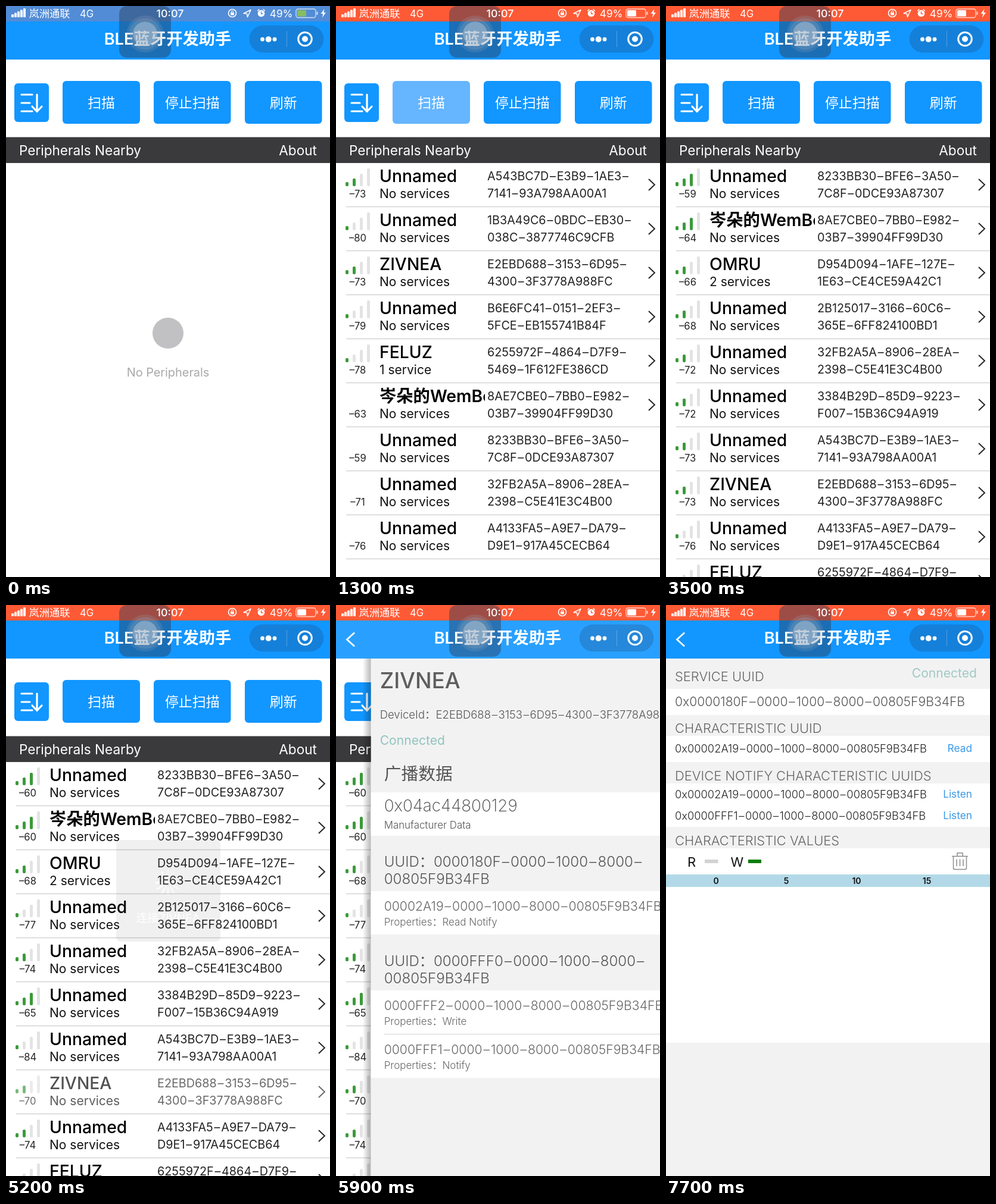
An HTML page for the animation above (8000 ms loop, 544x960 px).

```html
<!DOCTYPE html>
<html lang="zh-CN">
<head>
<meta charset="utf-8">
<title>BLE</title>
<style>
html, body { margin: 0; width: 100%; height: 100%; overflow: hidden; background: #fff; }
svg { display: block; width: 100%; height: 100%; }
text { font-family: Inter, "Noto Sans CJK SC", "Noto Sans CJK", sans-serif; white-space: pre; }
tspan { letter-spacing: .09em; }
</style>
</head>
<body>
<svg id="stage" viewBox="0 0 544 960">
  <defs>
    <clipPath id="nameClip"><rect x="0" y="0" width="250" height="74"/></clipPath>
    <linearGradient id="edge"><stop offset="0" stop-opacity="0"/><stop offset="1" stop-opacity=".28"/></linearGradient>
  </defs>
  <rect width="544" height="960" fill="#fff"/>
  <g id="home"></g>
  <g id="list"></g>
  <g id="toast"></g>
  <g id="device"></g>
  <g id="service"></g>
  <g id="nav"></g>
</svg>
<script>
const LOOP = 8000;
const BLUE = '#1296ff', PALE = '#f2f2f2';
const DEVICE = 'ZIVNEA', DEVICE_ID = 'E2EBD688-3153-6D95-4300-3F3778A988FC';
const TAIL = '-0000-1000-8000-';
const NODE = '00805F9B34FB';
const $ = id => document.getElementById(id);

// drawing helpers; dashes inside ids are long and loosely set
const dashes = s => s.replace(/^-/, '–').replace(/-/g, '<tspan dx=".09em">–</tspan>');
const text = (x, y, size, fill, s, weight = 400, anchor = 'start') =>
  `<text x="${x}" y="${y}" font-size="${size}" fill="${fill}" font-weight="${weight}" text-anchor="${anchor}">${dashes(s)}</text>`;
const rect = (x, y, w, h, fill, r = 0, more = '') =>
  `<rect x="${x}" y="${y}" width="${w}" height="${h}" rx="${r}" fill="${fill}" ${more}/>`;
const disc = (x, y, r, fill, more = '') => `<circle cx="${x}" cy="${y}" r="${r}" fill="${fill}" ${more}/>`;
const line = (d, stroke, w, more = '') => `<path d="${d}" fill="none" stroke="${stroke}" stroke-width="${w}" ${more}/>`;
const ROUND = 'stroke-linecap="round" stroke-linejoin="round"';

// id: [name, services, uuid]
const peers = {
  a: ['Unnamed', 0, 'A543BC7D-E3B9-1AE3-7141-93A798AA00A1'],
  b: ['Unnamed', 0, '1B3A49C6-0BDC-EB30-038C-3877746C9CFB'],
  c: [DEVICE, 0, DEVICE_ID],
  d: ['Unnamed', 0, 'B6E6FC41-0151-2EF3-5FCE-EB155741B84F'],
  e: ['FELUZ', 1, '6255972F-4864-D7F9-5469-1F612FE386CD'],
  f: ['岑朵的WemBook', 0, '8AE7CBE0-7BB0-E982-03B7-39904FF99D30'],
  g: ['Unnamed', 0, '8233BB30-BFE6-3A50-7C8F-0DCE93A87307'],
  h: ['Unnamed', 0, '32FB2A5A-8906-28EA-2398-C5E41E3C4B00'],
  i: ['Unnamed', 0, 'A4133FA5-A9E7-DA79-D9E1-917A45CECB64'],
  j: ['OMRU', 2, 'D954D094-1AFE-127E-1E63-CE4CE59A42C1'],
  k: ['Unnamed', 0, '2B125017-3166-60C6-365E-6FF824100BD1'],
  l: ['Unnamed', 0, '3384B29D-85D9-9223-F007-15B36C94A919']
};

// time, row order, signal strengths
const scans = [
  [0, '', ''],
  [1200, 'abcdef', '73 80 73 79 78 63'],
  [1300, 'abcdefghi', '73 80 73 79 78 63 59 71 76'],
  [1500, 'abcdefghij', '73 80 73 79 78 63 59 71 76 66'],
  [2500, 'gfjkhlacie', '59 64 66 68 72 72 73 73 76 78'],
  [3600, 'gfjkhlacie', '60 64 66 71 72 68 73 73 76 78'],
  [4200, 'gfjkhlacie', '60 62 68 77 72 65 79 70 76 78'],
  [4700, 'gfjkhlacie', '60 60 68 77 74 65 84 70 74 78']
];

function row(id, rssi, n, partial, dim) {
  const [name, count, uuid] = peers[id];
  const level = rssi <= 65 ? 3 : rssi <= 75 ? 2 : 1;
  const heights = [7, 13, 21, 30];
  const bars = partial && n > 4 ? '' : heights.map((h, i) =>
    rect(16 + 12 * i, 39 - h, 5, h, i < level ? '#3a9a3a' : '#e3e3e3', 2)).join('');
  const arrow = partial && n > 5 ? '' : line('M525 27l10 9.5l-10 9.5', '#222', 1.9);
  const services = count ? `${count} service${count > 1 ? 's' : ''}` : 'No services';
  const weight = /[A-Za-z]/.test(name[0]) ? 500 : 600;
  return `<g transform="translate(0 ${264 + 74 * n})"><g opacity="${dim ? .68 : 1}">` + bars +
    text(36.5, 58, 16.6, '#222', '-' + rssi, 400, 'middle') +
    `<g clip-path="url(#nameClip)">${text(73, 32, 28.3, '#000', name, weight)}</g>` +
    text(73, 59, 21, '#111', services) +
    text(254, 29, 19.8, '#222', uuid.slice(0, 19)) +
    text(254, 58, 19.8, '#222', uuid.slice(19)) + arrow + '</g>' +
    line('M17 73.5H544', '#d4d4d4', 1.6) + '</g>';
}

function button(x, w, label, id) {
  return rect(x, 126, w, 72, BLUE, 6, id ? `id="${id}"` : '') +
    text(x + w / 2, 171, 23, '#fff', label, 400, 'middle');
}

$('home').innerHTML =
  rect(14, 130, 58, 65, BLUE, 6) +
  line('M26 149H44M26 163H40M26 177H44M52 149V177M44 169L52 177.5L60 169', '#fff', 3.2, ROUND) +
  button(95, 130, '扫描', 'scan') + button(248, 129.5, '停止扫描') + button(401, 129.5, '刷新') +
  rect(0, 220.5, 544, 43.5, '#3a3a3c') +
  text(22, 250.5, 22.6, '#fff', 'Peripherals Nearby') +
  text(522, 250.5, 22.6, '#fff', 'About', 400, 'end') +
  `<g id="empty">${disc(272, 550, 26, '#c1c1c3')}${text(272, 622.5, 19.9, '#a9a9a9', 'No Peripherals', 400, 'middle')}</g>`;

let spokes = '';
for (let i = 0; i < 12; i++)
  spokes += line('M272 458v-11', '#fff', 3, `${ROUND} opacity="${.3 + i * .06}" transform="rotate(${i * 30} 272 467)"`);
$('toast').innerHTML = rect(185, 395, 175, 171, '#4a4a4a', 8) + spokes +
  text(272, 533, 19, '#fff', '连接' + DEVICE, 400, 'middle');

const page = rect(-14, 90, 14, 870, 'url(#edge)') + rect(0, 90, 544, 870, PALE);
const chevron = y => line(`M513 ${y - 10}l10.5 10l-10.5 10`, '#c4c4c4', 1.8);
const trait = (y, uuid, props, id) => `<g id="${id}" fill="#666">` +
  text(22, y, 21.2, 'inherit', uuid + TAIL + NODE, 300) +
  text(22, y + 24.5, 17, 'inherit', 'Properties：' + props, 300) + '</g>' + chevron(y + 4);
const group = (y, uuid) =>
  text(22, y, 24.1, '#555', `UUID：${uuid}${TAIL}`, 300) + text(22, y + 29, 24.1, '#555', NODE, 300);

$('device').innerHTML = page +
  text(15, 140, 36.6, '#5e5e5e', DEVICE, 500) +
  text(15, 190.5, 18.5, '#555', 'DeviceId：' + DEVICE_ID, 300) +
  text(15, 235, 21.1, '#90c4bd', 'Connected') +
  text(22, 293.5, 28.8, '#555', '广播数据') +
  rect(0, 315, 544, 73, '#fff') +
  text(22, 347, 27.9, '#444', '0x04ac44800129', 200) +
  text(22, 376, 16.9, '#555', 'Manufacturer Data', 300) +
  group(440, '0000180F') + rect(0, 481, 544, 73, '#fff') +
  trait(514, '00002A19', 'Read Notify', 'picked') +
  group(606.5, '0000FFF0') + rect(0, 648, 544, 147, '#fff') +
  trait(681, '0000FFF2', 'Write', 'writer') + line('M22 721.5H544', '#dedede', 1.4) +
  trait(755, '0000FFF1', 'Notify', 'notifier');

const heading = (y, s) => text(15, y, 21.9, '#666', s, 300);
const action = (y, uuid, verb) =>
  text(15, y, 18.3, '#222', `0x${uuid}${TAIL}${NODE}`, 300) +
  text(514, y - 1, 17.3, '#3b98e6', verb, 400, 'end');

$('service').innerHTML = page +
  [[141, 44], [220, 44], [300, 73], [409, 327]].map(([y, h]) => rect(0, y, 544, h, '#fff')).join('') +
  heading(127.5, 'SERVICE UUID') +
  text(522, 122, 21.1, '#a0c9c3', 'Connected', 400, 'end') +
  text(15, 170, 21.1, '#555', `0x0000180F${TAIL}${NODE}`, 300) +
  heading(215, 'CHARACTERISTIC UUID') +
  action(248, '00002A19', 'Read') +
  heading(294.5, 'DEVICE NOTIFY CHARACTERISTIC UUIDS') +
  action(325, '00002A19', 'Listen') + action(361, '0000FFF1', 'Listen') +
  heading(403.5, 'CHARACTERISTIC VALUES') +
  text(36, 440, 22, '#111', 'R') + rect(65, 428, 22.5, 6, '#d3d3d3') +
  text(108.5, 440, 22, '#111', 'W') + rect(138, 428, 22, 6, '#0a7d0a') +
  line('M480 422.5H507M489 422V417H498V422M482.5 423V442Q482.5 444.5 485 444.5H502Q504.5 444.5 504.5 442V423M488 427.5V439M493.5 427.5V439M499 427.5V439', '#8c8c8c', 1.5) +
  rect(0, 453, 544, 21, '#b3d9e8') +
  [0, 5, 10, 15].map(n => text(84 + n * 23.6, 468.5, 14, '#111', '' + n, 600, 'middle')).join('');

let signal = '';
for (let i = 0; i < 5; i++) signal += rect(9 + i * 5, 14 - i * 2.5, 4, 5 + i * 2.5, '#fff', 1);

$('nav').innerHTML = rect(0, 26, 544, 64, BLUE) + rect(0, 26, 544, 64, '#fff', 0, 'id="veil"') +
  rect(0, 0, 544, 26, '#ff5a36', 0, 'id="bar"') +
  rect(190, 0, 87, 87, 'rgba(40,60,90,.45)', 13) + signal +
  text(38.5, 18.5, 17.3, '#fff', '岚洲通联') + text(124, 18.5, 16.6, '#fff', '4G') +
  text(275.5, 18.5, 17.9, '#fff', '10:07', 500, 'middle') +
  disc(380, 12, 6.5, 'none', 'stroke="#fff" stroke-width="1.6"') + rect(377, 11, 6, 4.5, '#fff', 1) +
  line('M378.3 11.5V10a1.7 1.7 0 0 1 3.4 0V11.5', '#fff', 1.1) +
  line('M399 12.5L411 6.5L405.5 18.5L404.5 13Z', '#fff', 1.5, 'stroke-linejoin="round"') +
  disc(428.5, 12.5, 5.8, '#fff') + line('M422.7 8l2.2-2.2M434.3 8l-2.2-2.2', '#fff', 1.6, ROUND) +
  line('M428.5 9V13H431.5', '#ff5a36', 1.3, 'id="hands"') +
  text(481.5, 18.5, 17.2, '#fff', '49%', 400, 'end') +
  rect(487, 5, 33, 14.5, 'none', 3.5, 'stroke="#fff" stroke-opacity=".75" stroke-width="1.3"') +
  rect(489, 7, 15, 10.5, '#fff', 1.5, 'id="charge"') + rect(521.5, 9.5, 2, 5.5, '#fff', 1, 'opacity=".75"') +
  '<path d="M534.5 5L528.5 13H532.3L531 19.5L537 11H533.3Z" fill="#fff"/>' +
  line('M31 46.5L18.5 58L31 69.5', '#fff', 2.8, 'id="back"') +
  text(271.5, 65, 27.3, '#fff', 'BLE蓝牙开发助手', 600, 'middle') +
  rect(409, 33, 124, 45, 'rgba(30,60,100,.24)', 22.5, 'stroke="#000" stroke-opacity=".06"') +
  disc(430.5, 56, 3.4, '#fff') + disc(440.7, 56, 5, '#fff') + disc(451, 56, 3.4, '#fff') +
  line('M471.5 42V69', '#fff', 1, 'opacity=".25"') +
  disc(502, 55.5, 11.3, 'none', 'stroke="#fff" stroke-width="3"') + disc(502, 55.5, 5, '#fff') +
  disc(233.5, 47, 31, '#8fa3b8', 'opacity=".2"') + disc(233.5, 47, 26.5, '#8fa3b8', 'opacity=".25"') +
  disc(233.5, 47, 20.5, '#b4c4d4', 'opacity=".5"');

const set = (id, name, value) => $(id).setAttribute(name, value);
const ease = (t, from, to) => {
  const p = Math.min(1, Math.max(0, (t - from) / (to - from)));
  return p * p * (3 - 2 * p);
};
const mix = p => `rgb(${[[82, 255], [140, 90], [214, 54]].map(([a, b]) => Math.round(a + (b - a) * p))})`;
const within = (t, from, to) => t >= from && t < to;

function slide(id, p) {
  set(id, 'transform', `translate(${(544 * (1 - p)).toFixed(1)} 0)`);
  set(id, 'visibility', p > 0 ? 'visible' : 'hidden');
}

function draw(t) {
  const [at, order, levels] = scans.filter(s => s[0] <= t).pop();
  const rssi = levels.split(' ');
  const dim = within(t, 5200, 5500);
  $('list').innerHTML = [...order].map((id, n) => row(id, +rssi[n], n, at < 1500, dim && id === 'c')).join('');
  set('empty', 'visibility', order ? 'hidden' : 'visible');
  set('scan', 'fill', within(t, 1100, 1500) ? '#65b5ff' : BLUE);

  const red = mix(t < 200 ? 0 : Math.min(1, (t - 100) / 300));
  set('bar', 'fill', red);
  set('hands', 'stroke', red);
  set('charge', 'fill', t < 200 ? '#86bd62' : t < 300 ? '#c3deb0' : '#fff');

  set('toast', 'opacity', within(t, 5200, 5600) ? [.08, .5, .9, .9][(t - 5200) / 100] : 0);

  const push = ease(t, 5510, 6000);
  slide('device', push);
  slide('service', ease(t, 7310, 7700));
  set('back', 'opacity', Math.min(1, push * 1.5));
  set('veil', 'opacity', push * (1 - push));
  set('picked', 'fill', within(t, 7200, 7400) ? '#9a9a9a' : '#666');
}

const start = performance.now();
let shown = -1;
function tick() {
  const t = Math.floor((performance.now() - start) % LOOP / 100) * 100;
  if (t !== shown) draw(shown = t);
  requestAnimationFrame(tick);
}
tick();
</script>
</body>
</html>
```
